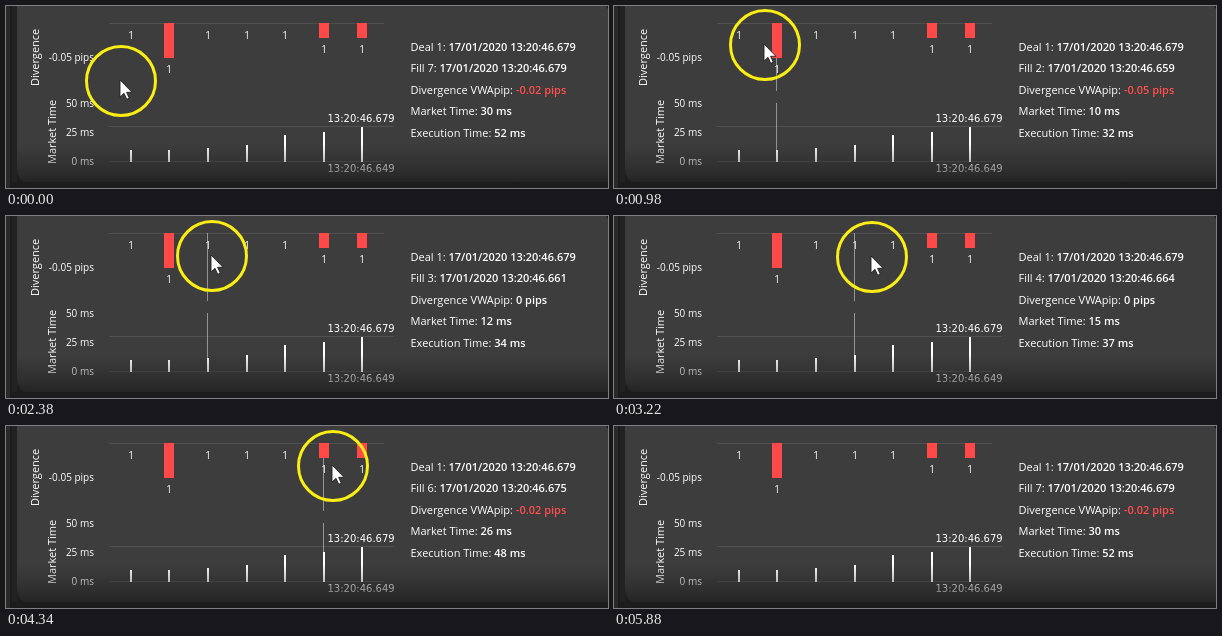
An HTML page that plays this animation: 602 px wide and 182 px high, repeating every 6.71 s.

```html
<!DOCTYPE html>
<html lang="en">
<head>
<meta charset="utf-8">
<title>Fill inspector</title>
<style>
  html, body { margin: 0; width: 100%; height: 100%; overflow: hidden; background: #1c1c1c; }
  svg { display: block; }
  text { font: 10px "Open Sans", sans-serif; fill: #fff; }
  .big, .big text { font-size: 11px; }
  .val { font-weight: 600; }
  .neg { fill: #ff4f4f; }
  .end { text-anchor: end; }
  .mid { text-anchor: middle; }
  .stamp { font-family: "DejaVu Sans", sans-serif; }
</style>
</head>
<body>
<svg width="602" height="182" viewBox="0 0 602 182">
  <defs>
    <linearGradient id="fade" x1="0" y1="0" x2="0" y2="1">
      <stop offset="0" stop-color="#1c1c1c" stop-opacity="0"/>
      <stop offset=".6" stop-color="#1c1c1c" stop-opacity=".4"/>
      <stop offset="1" stop-color="#1c1c1c" stop-opacity=".8"/>
    </linearGradient>
  </defs>
  <rect width="4" height="182" fill="#292929"/>
  <rect x="6" width="6" height="176" fill="#222"/>
  <path d="M11 0H600L602 3V176H21Q11 176 11 160Z" fill="#3c3d3c"/>
  <path d="M103 17.5H378M103 120.5H388M103 155.5H378" stroke="#505050"/>
  <path id="guide" d="M0 17V85M0 97V156" stroke="#c8d0d0" stroke-opacity=".6"/>
  <g id="chart"></g>
  <text class="big" transform="translate(33 80) rotate(-90)">Divergence</text>
  <text class="big" transform="translate(50 158) rotate(-90)">Market Time</text>
  <text class="end" x="88" y="55">-0.05 pips</text>
  <g id="scale" class="end"></g>
  <text class="stamp" x="321.5" y="116">13:20:46.679</text>
  <text class="stamp" x="321.5" y="166">13:20:46.649</text>
  <rect x="11" y="138" width="591" height="40" fill="url(#fade)"/>
  <g id="info" class="big"></g>
  <g id="pointer">
    <circle r="34.5" fill="none" stroke="#fbee14" stroke-width="3"/>
    <path d="M-1 -1V16L3 12.3L5.7 18.3L8.3 17.2L5.6 11.3H11Z" fill="#fff" stroke="#222" stroke-width=".9"/>
  </g>
</svg>
<script>
const LOOP = 6710, STEP = 140, GONE = 42;
const $ = id => document.getElementById(id);
const colX = i => Math.floor(124.4 + 38.55 * i);

const marketMs = [10, 10, 12, 15, 23, 26, 30];
const divergence = [0, -.05, 0, 0, 0, -.02, -.02];

// one move per fill, then the exit: first step, number of steps, x, y
const moves = [
  [1, 2, 126, 36], [5, 5, 165, 41], [11, 4, 198, 40], [17, 4, 250, 41],
  [23, 3, 280, 41], [28, 6, 344, 40], [36, 4, 360, 40], [41, 2, 372, 40]
];

$('scale').innerHTML = [50, 25, 0].map((ms, i) =>
  `<text x="88" y="${101 + 29 * i}">${ms} ms</text>`).join('');

$('chart').innerHTML = marketMs.map((ms, i) => {
  const x = colX(i), h = Math.round(ms * 1.16);
  const drop = divergence[i] && Math.round(1 - 680 * divergence[i]);
  return `<rect x="${x - 4}" y="17" width="10" height="${drop}" fill="#ff4848"/>
    <rect x="${x}" y="${156 - h}" width="2" height="${h}" fill="#fff"/>
    <text class="mid" x="${x + 1}" y="${33 + Math.max(0, drop - 1)}">1</text>`;
}).join('');

// pointer place and highlighted column (-1 before the first) at a step
function poseAt(n) {
  let x = 115, y = 75, col = -1;
  moves.forEach(([from, steps, toX, toY], i) => {
    const p = Math.max(0, Math.min(1, (n - from + 1) / steps));
    const k = p * p * (3 - 2 * p);
    x += (toX - x) * k;
    y += (toY - y) * k;
    if (p >= .5) col = Math.min(i, 6);
  });
  return { x, y, col };
}

function showInfo(i) {
  const ms = marketMs[i], day = '17/01/2020 13:20:46.';
  const rows = [
    ['Deal 1', day + 679],
    ['Fill ' + (i + 1), day + (649 + ms)],
    ['Divergence VWApip', divergence[i] + ' pips'],
    ['Market Time', ms + ' ms'],
    ['Execution Time', ms + 22 + ' ms']
  ];
  $('info').innerHTML = rows.map(([label, value], r) =>
    `<text x="404.5" y="${45 + Math.floor(21.5 * r)}">${label}: <tspan class="val${
      value[0] === '-' ? ' neg' : ''}">${value}</tspan></text>`).join('');
}

function place(id, visible, x, y) {
  $(id).setAttribute('visibility', visible ? 'visible' : 'hidden');
  $(id).setAttribute('transform', `translate(${x} ${y})`);
}

let shown;
function draw(t) {
  const n = Math.floor(t % LOOP / STEP);
  if (n === shown) return;
  shown = n;
  const { x, y, col } = poseAt(n);
  showInfo(col < 0 ? 6 : col);
  place('guide', col >= 0 && n < GONE, colX(col) + .5, 0);
  place('pointer', n < GONE, Math.round(x), Math.round(y));
}

const start = performance.now();
function tick() {
  draw(performance.now() - start);
  requestAnimationFrame(tick);
}
tick();
</script>
</body>
</html>
```
